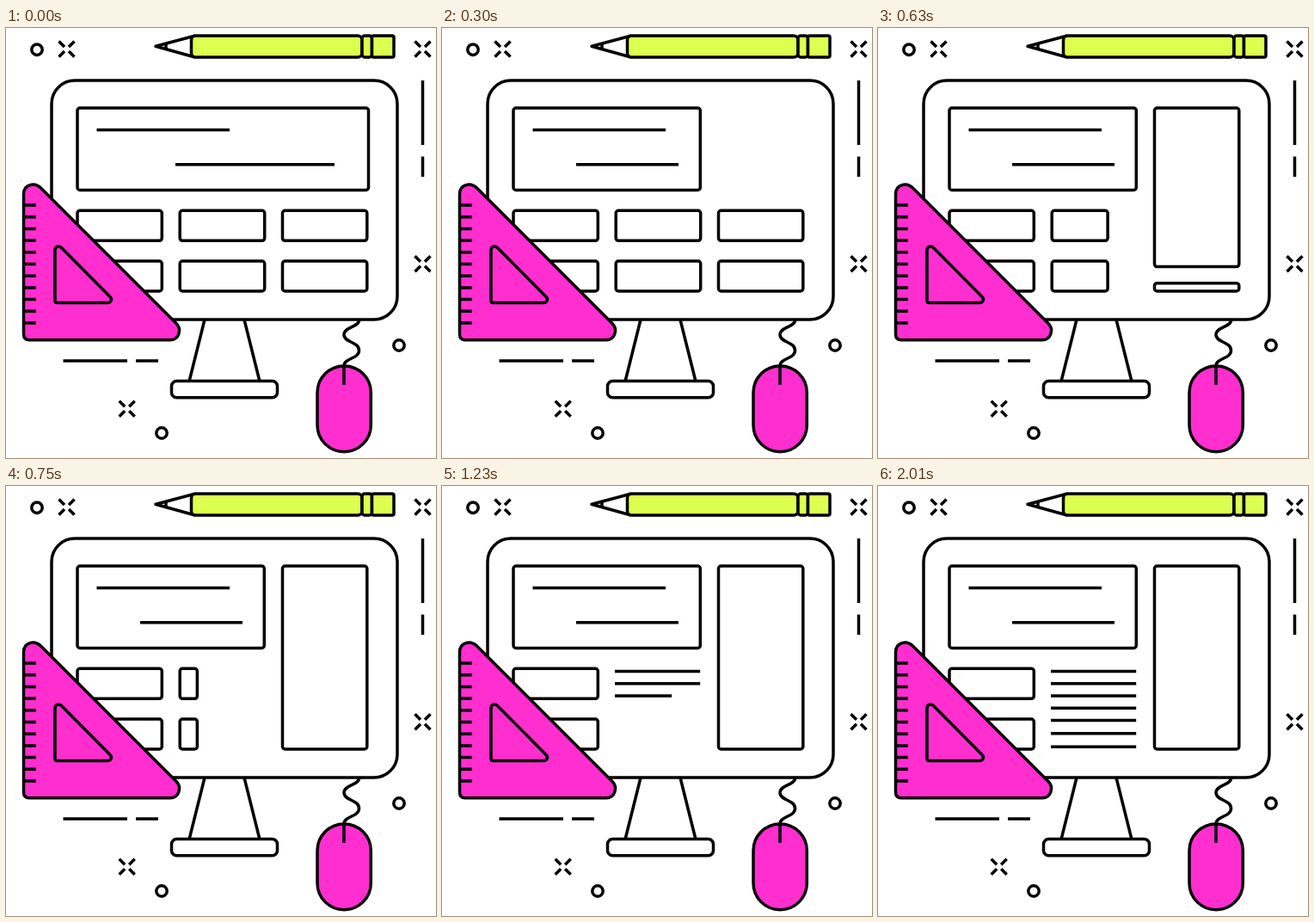
Write an HTML page that moves like this. It is 500 px wide and 500 px high and loops after 2.04 s.

```html
<!DOCTYPE html>
<html>
<head>
<meta charset="utf-8">
<style>
html, body { margin: 0; width: 100%; height: 100%; overflow: hidden; background: #fff }
svg { display: block; width: 100%; height: 100% }
.pink { fill: #ff2ecf }
.lime { fill: #dcff50 }
</style>
</head>
<body>
<svg viewBox="0 0 500 500" fill="none" stroke="#000" stroke-width="3.5" stroke-linejoin="round">
  <defs><path id="spark" d="M-9-9l6.5 6.5M9-9l-6.5 6.5M-9 9l6.5-6.5M9 9l-6.5-6.5"/></defs>

  <!-- scattered decoration -->
  <use href="#spark" x="70.5" y="24.5"/>
  <use href="#spark" x="484.5" y="24.5"/>
  <use href="#spark" x="484.5" y="274.3"/>
  <use href="#spark" x="140.7" y="442.7"/>
  <circle cx="36" cy="25.2" r="6.2"/>
  <circle cx="457" cy="369" r="6.2"/>
  <circle cx="181" cy="471" r="6.2"/>
  <path d="M484.5 61V136M484.5 149.5V173M66.5 387H141M151 387H177"/>

  <!-- pencil -->
  <path d="M220 9L174 21.3L220 34M186 17.5V25"/>
  <g class="lime">
    <rect x="215.5" y="9" width="198.5" height="25" rx="5"/>
    <rect x="414" y="9" width="11.5" height="25" rx="3"/>
    <rect x="425.5" y="9" width="25.5" height="25" rx="2"/>
  </g>

  <!-- monitor -->
  <rect x="53" y="61" width="402" height="278" rx="27"/>
  <path d="M231 339L213 411M277 339L295 411"/>
  <rect x="192.5" y="410.5" width="123" height="19.2" rx="6"/>
  <path d="M105.5 118.5H260"/>
  <rect x="83" y="212.3" width="98.3" height="35" rx="3"/>
  <rect x="83" y="271" width="98.3" height="35" rx="3"/>
  <g id="panels"></g>
  <path id="lines"/>

  <!-- set square -->
  <path class="pink" d="M20.5 193C20.5 182 33 178.500 40.500 186L198 343.500C205 350.500 201 362.700 191 362.700H27Q20.500 362.700 20.500 356Z"/>
  <path d="M57 258.500C57 254 61.500 252.500 64.500 255.500L121 312.500C124 315.500 122 319.500 118 319.500H59.500Q57 319.500 57 317Z"/>
  <path id="ticks"/>

  <!-- mouse -->
  <rect class="pink" x="362" y="393" width="62.300" height="99.700" rx="31"/>
  <path d="M410.500 339C411.500 348 393 347 393 356.500C393 366 410.500 364.500 410.500 375C410.500 385 393 383.500 393 393V415"/>
</svg>
<script>
const el = id => document.getElementById(id);
const ramp = (t, a, b) => Math.min(1, Math.max(0, (t - a) / (b - a)));
const mix = (a, b, p) => a + (b - a) * p;
const box = (x, y, w, h) => w > 0 && h > 0
  ? `<rect x="${x}" y="${y}" width="${w}" height="${h}" rx="3"/>` : '';

const STEP = 30, LOOP = 2040;
const rows = [215.5, 229.8, 244, 258.2, 272.5, 287.8, 303.3];
const starts = [26.8, 32.8, 37, 43, 49, 55, 61, 67];

el('ticks').setAttribute('d',
  Array.from({ length: 11 }, (_, i) => `M20.5 ${206 + i * 13.7}H35`).join(''));

function draw(t) {
  const header = ramp(t, 0, 10);
  const top = mix(212.3, 93, ramp(t, 10, 16.6));
  const bottom = mix(247.3, 306, ramp(t, 17.8, 24));
  const lower = mix(271, 306, ramp(t, 16.6, 22.6));
  const midWidth = 98.5 * (1 - ramp(t, 18, 26.8));

  el('panels').innerHTML =
    box(83, 93, mix(338.5, 217.3, header), 95.5) +
    box(321.5, top, 98.3, bottom - top) +
    box(321.5, lower, 98.3, 306 - lower) +
    box(202.2, 212.3, midWidth, 35) +
    box(202.2, 271, midWidth, 35);

  let d = `M${mix(197, 156, header)} 158.7H${mix(382, 275, header)}`;
  rows.forEach((y, i) => {
    const p = ramp(t, starts[i], starts[i + 1]);
    if (p) d += `M201 ${y}H${201 + 99.2 * p}`;
  });
  el('lines').setAttribute('d', d);
}

const origin = performance.now();
function tick() {
  draw(Math.floor((performance.now() - origin) % LOOP / STEP));
  requestAnimationFrame(tick);
}
tick();
</script>
</body>
</html>
```
